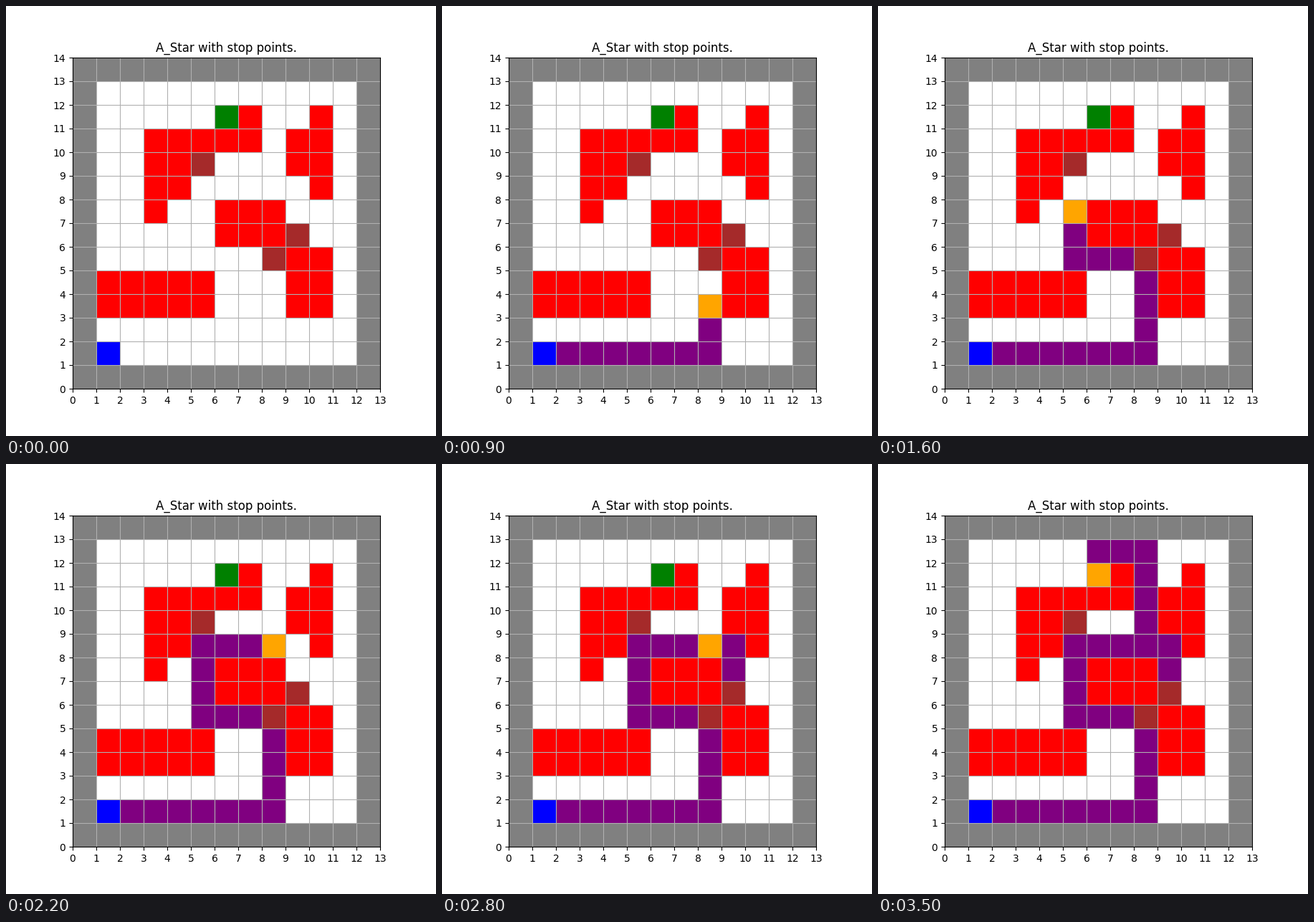
A matplotlib script for the animation above (3.6 s loop, 600x600 px).

```python
import matplotlib.pyplot as plt
import numpy as np
from matplotlib.animation import FuncAnimation
from matplotlib.colors import ListedColormap

# Top row first: wall, free, obstacle, stop point, start, goal
MAZE = """
#############
#...........#
#.....GR..R.#
#..RRRRR.RR.#
#..RRB...RR.#
#..RR.....R.#
#..R..RRR...#
#.....RRRB..#
#.......BRR.#
#RRRRR...RR.#
#RRRRR...RR.#
#...........#
#S..........#
#############
""".split()

KINDS = ".#RBSGPA"
COLORS = ["white", "gray", "red", "brown", "blue", "green", "purple", "orange"]
FREE, STOP, TRAIL, AGENT = (KINDS.index(k) for k in ".BPA")

# Corners of the route, visiting each stop point before the goal
CORNERS = [(1, 1), (8, 1), (8, 5), (5, 5), (5, 9), (5, 8), (9, 8), (9, 6),
           (9, 8), (8, 8), (8, 12), (6, 12), (6, 11)]


def walk(corners):
    cells = [corners[0]]
    for goal in corners[1:]:
        while cells[-1] != goal:
            x, y = cells[-1]
            cells.append((x + int(np.sign(goal[0] - x)),
                          y + int(np.sign(goal[1] - y))))
    return cells


base = np.array([[KINDS.index(c) for c in row] for row in reversed(MAZE)])
path = walk(CORNERS)
rows, cols = base.shape

fig, ax = plt.subplots(figsize=(6, 6), dpi=100)
mesh = ax.pcolormesh(np.arange(cols + 1), np.arange(rows + 1), base,
                     cmap=ListedColormap(COLORS),
                     vmin=-0.5, vmax=len(COLORS) - 0.5)
ax.set_aspect("equal")
ax.set_xticks(range(cols + 1))
ax.set_yticks(range(rows + 1))
ax.grid(True)
ax.set_title("A_Star with stop points.")


def update(step):
    grid = base.copy()
    for x, y in path[1:step]:
        if grid[y, x] == FREE:
            grid[y, x] = TRAIL
    if step:
        x, y = path[step]
        grid[y, x] = AGENT
    mesh.set_array(grid)
    return [mesh]


anim = FuncAnimation(fig, update, frames=len(path), interval=100,
                     repeat=True, repeat_delay=0)
plt.show()
```
